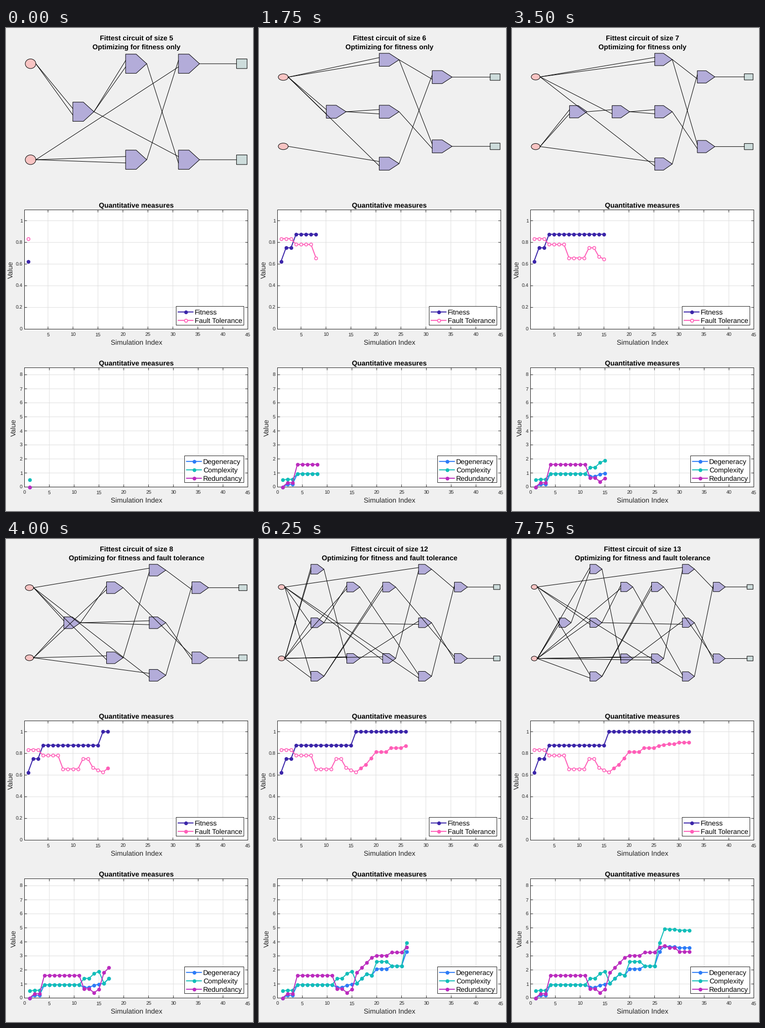
A matplotlib script for the animation above (8 s loop, 500x976 px).

```python
import matplotlib.pyplot as plt
import numpy as np
from matplotlib.animation import FuncAnimation
from matplotlib.patches import Ellipse, Polygon, Rectangle

W, H = 500, 976
STEPS, INTERVAL = 32, 250
PX = 0.72  # points per pixel at 100 dpi

plt.rcParams["font.family"] = "Liberation Sans"
plt.rcParams["text.hinting"] = "none"
plt.rcParams["path.snap"] = False

BACK, INK, GRID = "#f0f0f0", "#262626", "#dfdfdf"
GATE, SOURCE, SINK = "#b3acd9", "#f8c4c3", "#cddcdb"
INDIGO, PINK = "#3b25a9", "#ff5eb8"
BLUE, TEAL, PURPLE = "#2d7cf7", "#12beb9", "#bb2cbe"

# Simulation index from which fault tolerance is optimized too
TOLERANT_FROM = 17

# Circuits by the index they appear at. Columns are split by "/"; each gate
# lists its two sources and the last column the outputs. Sources a and b are
# the inputs, gates are named from c on.
CIRCUITS = {
    1: "aa/cc bb/eb cd/fg",
    4: "aa/aa cc ba/fd de/gh",
    12: "bb/ca/aa dd ba/ge ef/hi",
    16: "ab/cb ba/ae cc ba/hf dg/ij",
    18: "ba ab/dd ba/af cc ba/ig eh/jk",
    20: "bb ba ab/ee ba/ag cd ba/jh fi/kl",
    23: "bb ba ab/bc/ee ba/ah fd ba/ki gj/lm",
    26: "bb ba ab/db bc/ee ba/ai gd fa/lj hk/mn",
    27: "bb/bc ba ab/eb bd/ff bb/aj he ga/mk il/no",
}

fig = plt.figure(figsize=(W / 100, H / 100), dpi=100, facecolor=BACK)
ax = fig.add_axes([0, 0, 1, 1])
ax.set_xlim(0, W)
ax.set_ylim(H, 0)
ax.axis("off")

# The measures only move when evolution finds a new circuit
index = np.arange(1, STEPS + 1)
finds = np.array([1, 2, 4, 8, 12, *range(14, 21), 23, 26, 27, 28, 30])
held = finds[np.searchsorted(finds, index, side="right") - 1]


def staircase(*points):
    """Straight lines through (index, value) points, held between finds."""
    return np.interp(held, *zip(*points))


# Every improvement gets one more of eight cases right
fitness = (5 + sum((index >= k).astype(int) for k in (2, 4, 16))) / 8
tolerance = staircase((2, .835), (4, .781), (8, .657), (12, .75), (14, .667),
                      (16, .627), (18, .698), (20, .813), (23, .85), (30, .9))
degeneracy = staircase((1, 0), (2, .18), (4, .94), (8, .94), (12, .76),
                       (16, 1.05), (18, 1.72), (19, 1.62), (20, 2.08),
                       (23, 2.28), (26, 3.31), (27, 3.7), (30, 3.58))
complexity = staircase((1, .5), (2, .55), (4, .94), (8, .94), (12, 1.4),
                       (15, 1.9), (16, 1.05), (18, 1.72), (19, 1.62),
                       (20, 2.6), (23, 2.28), (26, 3.95), (27, 4.93), (30, 4.83))
redundancy = staircase((1, 0), (2, .3), (4, 1.61), (8, 1.61), (12, .66),
                       (14, .38), (15, .62), (16, 1.8), (19, 2.88),
                       (20, 3.03), (23, 3.25), (27, 3.73), (30, 3.3))


def text(x, y, s, size=14.1, **kw):
    kw = {"ha": "center", "va": "baseline", "color": INK, **kw}
    return ax.text(x, y, s, fontsize=size * PX, **kw)


def line(xs, ys, color=INK, width=1, **kw):
    return ax.plot(xs, ys, color=color, lw=width * PX, **kw)[0]


def box(x0, y0, x1, y1, z, **kw):
    ax.add_patch(Rectangle((x0, y0), x1 - x0, y1 - y0, lw=PX, zorder=z, **kw))


def dots(xs, ys, color, face):
    return ax.scatter(xs, ys, s=(6 * PX) ** 2, facecolors=face,
                      edgecolors=color, linewidths=1.6 * PX, zorder=6)


class Chart:
    LEFT, RIGHT = 37.5, 489.5

    def __init__(self, top, bottom, xmin, ymax):
        self.top, self.bottom, self.xmin, self.ymax = top, bottom, xmin, ymax

    def x(self, v):
        return self.LEFT + (v - self.xmin) / (45 - self.xmin) * (self.RIGHT - self.LEFT)

    def y(self, v):
        return self.bottom - v / self.ymax * (self.bottom - self.top)

    def frame(self, xticks, yticks, label_x):
        box(self.LEFT, self.top, self.RIGHT, self.bottom, 0, fc="white", ec="none")
        for v in xticks:
            x = self.x(v)
            line([x, x], [self.top, self.bottom], GRID, zorder=1)
            for y, d in ((self.top, 4.5), (self.bottom, -4.5)):
                line([x, x], [y, y + d], zorder=2)
            text(x, self.bottom + 14.5, str(v), 10)
        for v in yticks:
            y = self.y(v)
            line([self.LEFT, self.RIGHT], [y, y], GRID, zorder=1)
            for x, d in ((self.LEFT, 4.5), (self.RIGHT, -4.5)):
                line([x, x + d], [y, y], zorder=2)
            text(33.5, y + 3.5, f"{v:g}", 10, ha="right")
        box(self.LEFT, self.top, self.RIGHT, self.bottom, 3, fc="none", ec=INK)
        text(264, self.top - 5.5, "Quantitative measures", weight="bold", color="black")
        text(264, self.bottom + 31.5, "Simulation Index")
        text(label_x, (self.top + self.bottom) / 2, "Value",
             rotation=90, rotation_mode="anchor")

    def plot(self, n, values, color, hollow=0):
        """Draw the first n values, the first few with hollow markers."""
        xs, ys = self.x(index[:n]), self.y(values[:n])
        return [line(xs, ys, color, 2, zorder=6),
                dots(xs[hollow:], ys[hollow:], color, color),
                dots(xs[:hollow], ys[:hollow], color, "white")]


def legend(x0, y0, y1, entries):
    box(x0, y0, 481.5, y1, 4, fc="white", ec=INK)
    for i, (name, color) in enumerate(entries):
        y = y0 + 11.3 + 17 * i
        line([x0 + 4, x0 + 34], [y, y], color, 2, zorder=5)
        dots([x0 + 19], [y], color, color)
        text(x0 + 37.5, y + 5, name, ha="left", color="black", zorder=6)


def draw_circuit(wiring):
    columns = [c.split() for c in wiring.split("/")]
    counts = [2] + [len(c) for c in columns[:-1]] + [2]
    size = sum(counts) - 4

    # Unit-square layout, scaled to fill the panel
    unit = 1 / (size + 10)
    slots, rows = len(counts) + 1, max(counts)
    xscale = 449 / ((slots - 2) / slots + unit / 2)
    yscale = 245 / ((rows - 1) / (rows + 1) + unit + .021)
    gw, gh = unit * xscale, unit * yscale
    nw, nh = gw / 2, gh / 2
    nodes = [(263.5 + xscale * ((i + 1) / slots - .5),
              169.2 + yscale * ((k + 1) / (count + 1) - .5))
             for i, count in enumerate(counts) for k in range(count)]
    inputs, gates, outputs = nodes[:2], nodes[2:-2], nodes[-2:]

    style = dict(ec="black", lw=PX, zorder=2)
    shapes = [Ellipse(p, nw, nh, fc=SOURCE, **style) for p in inputs]
    shapes += [Rectangle((x - nw / 2, y - nh / 2), nw, nh, fc=SINK, **style)
               for x, y in outputs]
    shapes += [Polygon([(x - nw, y - nh), (x, y - nh), (x + nw, y),
                        (x, y + nh), (x - nw, y + nh)], fc=GATE, **style)
               for x, y in gates]
    arts = [ax.add_patch(s) for s in shapes]

    tips = [(x + nw / 2, y) for x, y in inputs] + [(x + nw, y) for x, y in gates]
    ports = [(x - nw, y + s * gh / 6) for x, y in gates for s in (-1, 1)]
    ports += [(x - nw / 2, y) for x, y in outputs]
    for name, (x, y) in zip("".join(sum(columns, [])), ports):
        tx, ty = tips[ord(name) - ord("a")]
        arts.append(line([tx, x], [ty, y], "black", zorder=3))
    return size, arts


upper = Chart(367.5, 608.5, .3, 1.1)
lower = Chart(686.5, 927.5, 0, 8.5)
upper.frame(range(5, 46, 5), np.arange(6) / 5, 14)
lower.frame(range(0, 46, 5), range(9), 20)
legend(344.5, 562.5, 600.5, [("Fitness", INDIGO), ("Fault Tolerance", PINK)])
legend(361.5, 864.5, 918.5, [("Degeneracy", BLUE), ("Complexity", TEAL),
                             ("Redundancy", PURPLE)])

live = []


def update(frame):
    while live:
        live.pop().remove()
    n = frame + 1
    tolerant = n >= TOLERANT_FROM
    size, arts = draw_circuit(CIRCUITS[max(k for k in CIRCUITS if k <= n)])
    live.extend(arts)
    goal = "fitness and fault tolerance" if tolerant else "fitness only"
    for y, s in ((25, f"Fittest circuit of size {size}"),
                 (43, f"Optimizing for {goal}")):
        live.append(text(264, y, s, weight="bold", color="black"))

    live.extend(upper.plot(n, fitness, INDIGO))
    live.extend(upper.plot(n, tolerance, PINK, min(n, TOLERANT_FROM - 1)))
    if not tolerant:
        live.append(dots([363.5], [590.8], PINK, "white"))
    for values, color in ((degeneracy, BLUE), (complexity, TEAL),
                          (redundancy, PURPLE)):
        live.extend(lower.plot(n, values, color))
    return live


anim = FuncAnimation(fig, update, frames=STEPS, interval=INTERVAL,
                     repeat=True, repeat_delay=0, blit=False)
plt.show()
```
